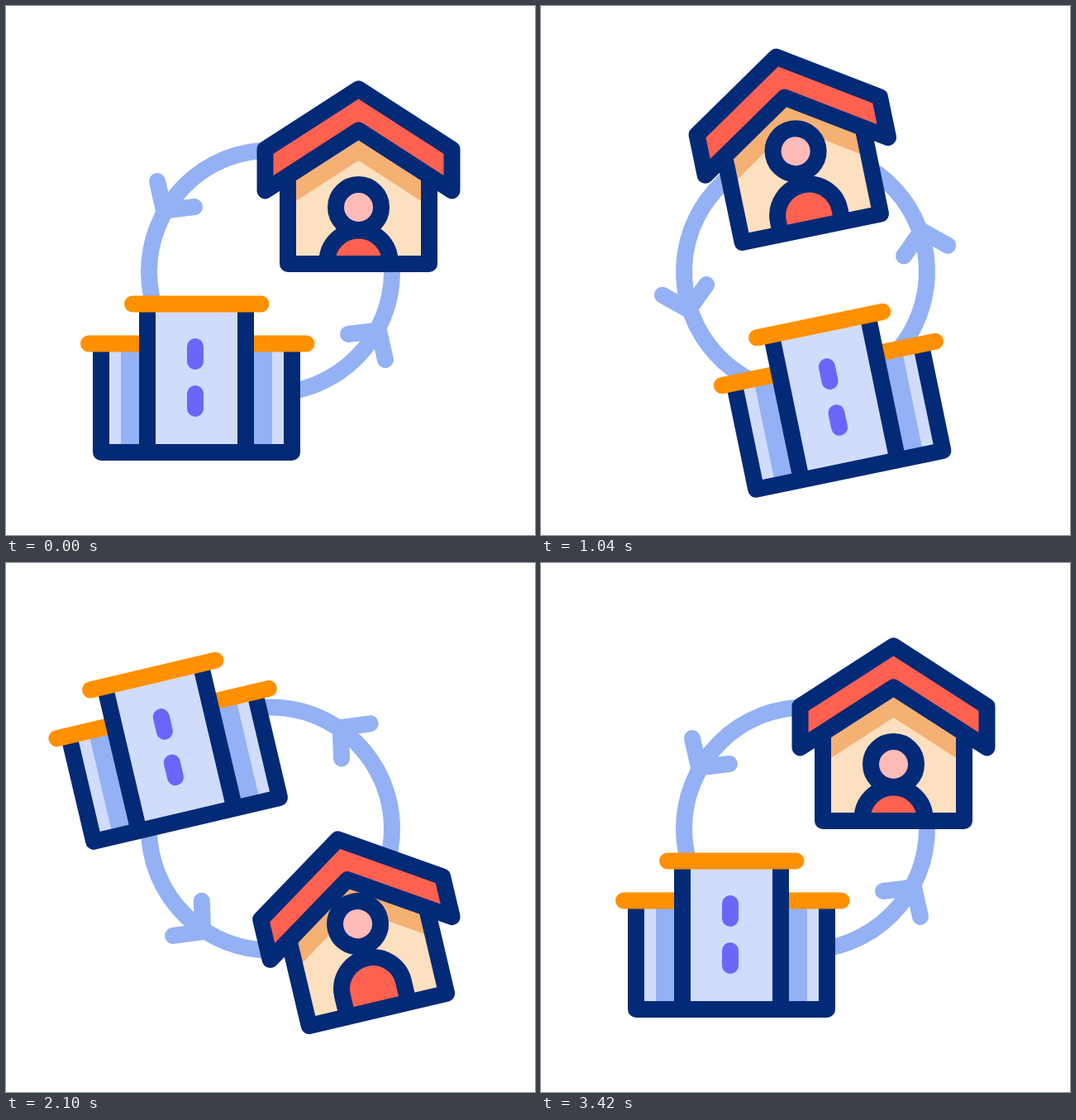
Recreate the animation shown at these times as an HTML page with a canvas. Size 640 by 640 pixels, loop 3.6 s.

```html
<!DOCTYPE html>
<html lang="en">
<head>
<meta charset="utf-8">
<title>Home and office cycle</title>
<style>
  html, body { margin: 0; width: 100%; height: 100%; overflow: hidden; background: #fff; }
  canvas { display: block; width: 100vw; height: 100vh; }
</style>
</head>
<body>
<canvas id="stage" width="640" height="640"></canvas>
<script>
const ctx = document.getElementById('stage').getContext('2d');
const SIZE = 640, LOOP = 3600, LINE = 20, SLOPE = 0.645;
const NAVY = '#032a76', SKY = '#93b1f4', PALE = '#d1dcfd', VIOLET = '#6b66fa', ORANGE = '#ff9000',
      RED = '#ff6151', TAN = '#f5b074', CREAM = '#fde0bf', PINK = '#fdbbb8';

const smooth = s => {
  const c = Math.min(1, Math.max(0, s));
  return c * c * (3 - 2 * c);
};
const ease = (t, from, to) => smooth((t - from) / (to - from));
const radians = deg => deg * Math.PI / 180;

// Wind up clockwise, make one full turn back, overshoot and settle.
const orbitAt = t => 10 * ease(t, 0, 400) - 380 * ease(t, 400, 3000) + 10 * ease(t, 3000, 3400);

// A pendulum that sways against the turn and comes to rest.
const tiltAt = t => -17.6 * ease(t, 0, 810) + 32.6 * ease(t, 810, 1660) - 31 * ease(t, 1660, 2200)
  + 22 * ease(t, 2200, 2600) - 6 * ease(t, 2600, 3000);

// Up, hold and down, 400 ms each, played twice.
function riseAt(t) {
  const beat = t / 400;
  if (beat < 0 || beat > 6) return 0;
  return smooth(Math.min(beat % 3, 3 - beat % 3));
}

function outline(points, closed) {
  ctx.beginPath();
  points.forEach(([x, y]) => ctx.lineTo(x, y));
  if (closed) ctx.closePath();
}

function paint(fill, stroke) {
  if (fill) {
    ctx.fillStyle = fill;
    ctx.fill();
  }
  if (stroke) {
    ctx.strokeStyle = stroke;
    ctx.stroke();
  }
}

function line(color, cap, ...points) {
  ctx.lineCap = cap;
  outline(points);
  paint(null, color);
}

function circle(x, y, r, fill, stroke) {
  ctx.beginPath();
  ctx.arc(x, y, r, 0, 2 * Math.PI);
  paint(fill, stroke);
}

function box(x, y, w, h, color) {
  ctx.fillStyle = color;
  ctx.fillRect(x, y, w, h);
}

// Chevron between two parallel roof lines, given the height of each peak.
function gable(half, top, bottom, fill, stroke) {
  const drop = half * SLOPE;
  outline([[-half, bottom + drop], [-half, top + drop], [0, top],
           [half, top + drop], [half, bottom + drop], [0, bottom]], true);
  paint(fill, stroke);
}

function drawRing() {
  circle(0, 0, 147, null, SKY);
  ctx.translate(1, -1.5);
  for (let i = 0; i < 2; i++) {
    line(SKY, 'round', [-138, -108], [-130, -72.5], [-93, -77]);
    ctx.rotate(Math.PI);
  }
}

function drawPerson(t) {
  const shoulders = 103.5 - 24.4 * riseAt(t - 50);
  const head = 37.5 - 38 * riseAt(t - 95);
  ctx.save();
  ctx.beginPath();
  ctx.rect(-85, -100, 170, 208);
  ctx.clip();
  ctx.beginPath();
  ctx.moveTo(-38, 150);
  ctx.arc(0, shoulders, 38, Math.PI, 2 * Math.PI);
  ctx.lineTo(38, 150);
  paint(RED, NAVY);
  ctx.restore();
  circle(0, head, 27.5, PINK, NAVY);
}

function drawHouse(t) {
  const half = 85.5, floor = 106, ceiling = -55.5;
  box(-half, 0, 2 * half, floor, CREAM);
  gable(half, ceiling, 0, CREAM);
  gable(half, ceiling, -19, TAN);
  gable(113, -105.5, ceiling, RED, NAVY);
  drawPerson(t);
  line(NAVY, 'butt', [-half, 0], [-half, floor], [half, floor], [half, 0]);
}

function drawOffice() {
  const half = 115.5, tower = 59.5, floor = 90, lowRoof = -41.5, highRoof = -89.5;
  box(-half, lowRoof, 2 * half, floor - lowRoof, PALE);
  box(-91.5, lowRoof, 183, floor - lowRoof, SKY);
  line(NAVY, 'butt', [-half, lowRoof], [-half, floor], [half, floor], [half, lowRoof]);
  line(ORANGE, 'round', [-130.5, lowRoof], [133, lowRoof]);

  box(-tower, highRoof, 2 * tower, floor - LINE / 2 - highRoof, PALE);
  for (const x of [-tower, tower]) line(NAVY, 'butt', [x, highRoof], [x, floor]);
  line(ORANGE, 'round', [-77.5, highRoof], [78, highRoof]);
  for (const y of [-38, 19]) line(VIOLET, 'round', [-1.5, y], [-1.5, y + 18]);
}

// Carries an item around the ring while it sways about its own pivot.
function carry(x, y, orbit, tilt, pivotX, pivotY, draw) {
  ctx.save();
  ctx.rotate(orbit);
  ctx.translate(x, y);
  ctx.rotate(tilt - orbit);
  ctx.translate(-pivotX, -pivotY);
  draw();
  ctx.restore();
}

function render(t) {
  const orbit = radians(orbitAt(t)), tilt = radians(tiltAt(t));
  box(0, 0, SIZE, SIZE, '#fff');
  ctx.save();
  ctx.lineWidth = LINE;
  ctx.lineJoin = 'round';
  ctx.translate(320, 321.5);
  carry(0, 0, orbit, orbit, 0, 0, drawRing);
  carry(-88.2, 128.7, orbit, tilt, 1.3, 0.2, drawOffice);
  carry(106.5, -115.2, orbit, tilt, 0, 0.3, () => drawHouse(t));
  ctx.restore();
}

const start = performance.now();
function tick() {
  render((performance.now() - start) % LOOP);
  requestAnimationFrame(tick);
}
tick();
</script>
</body>
</html>
```
